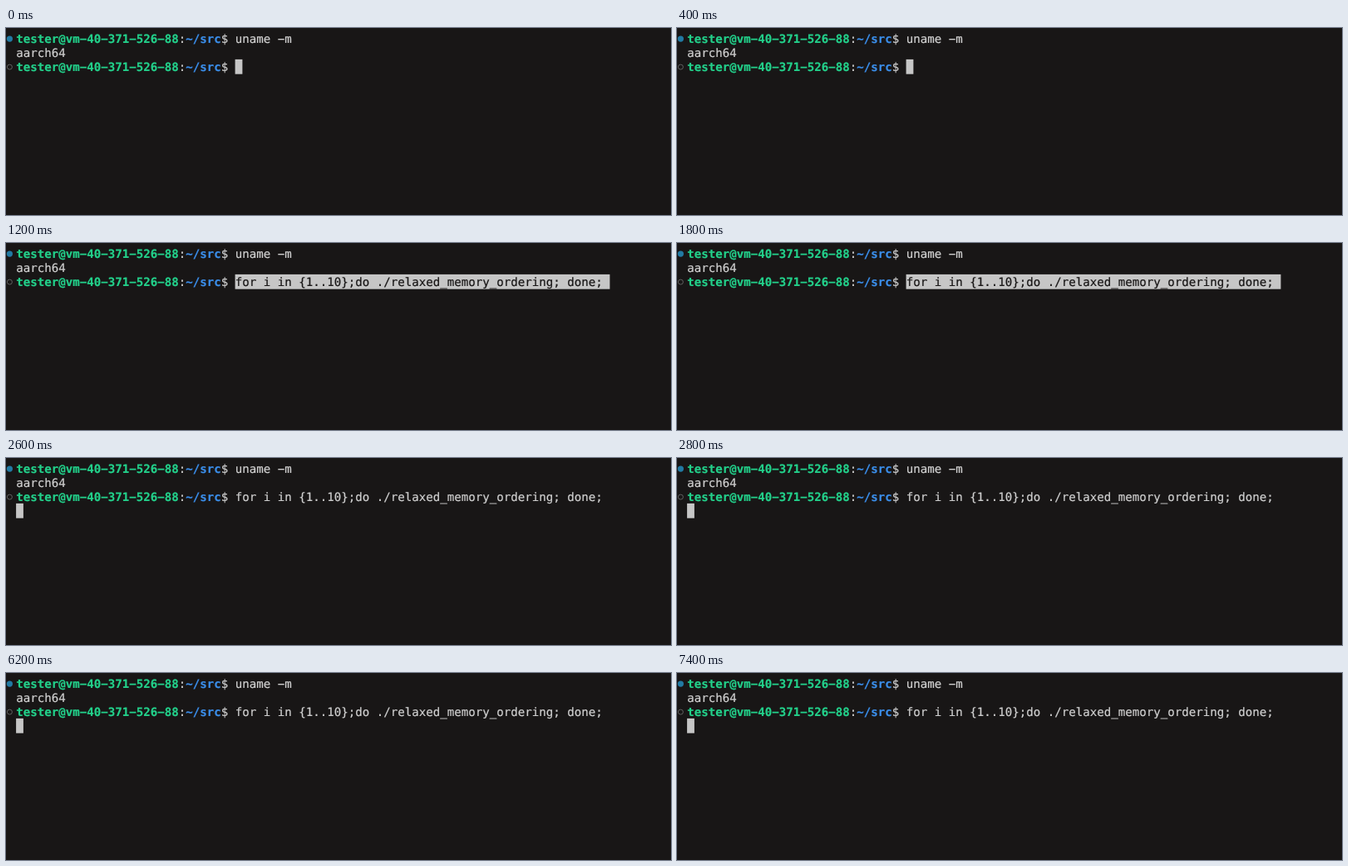
An HTML page with a canvas that plays this animation: 800 by 226 pixels, repeating every 8 s.

```html
<!DOCTYPE html>
<html lang="en">
<head>
<meta charset="utf-8">
<style>
  html, body { margin: 0; width: 100%; height: 100%; overflow: hidden; background: #181616; }
  canvas { display: block; }
</style>
</head>
<body>
<canvas width="800" height="226"></canvas>
<script>
const ctx = document.querySelector("canvas").getContext("2d");

const LOOP = 8000, PASTE_AT = 1200, RUN_AT = 2600;
const LEFT = 12.3, TOP = 4.5, CELL = 8.5, ROW = 17;
const BACK = "#181616", TEXT = "#d0d0d0", GREEN = "#23d18b", BLUE = "#3b8eea", BLOCK = "#c6c6c6";
const COMMAND = "for i in {1..10};do ./relaxed_memory_ordering; done;";

const columnX = column => LEFT + column * CELL;
const rowY = row => TOP + row * ROW;

// Each character sits in its own terminal cell; returns the next free column.
function write(text, column, row, color = TEXT, weight = "normal") {
  ctx.font = `${weight} 14.12px "DejaVu Sans Mono", monospace`;
  ctx.fillStyle = ctx.strokeStyle = color;
  ctx.lineWidth = 0.2;
  for (const char of text) {
    const glyph = char === "-" ? "\u2212" : char;
    const x = columnX(column++), y = rowY(row) + 13.4;
    ctx.fillText(glyph, x, y);
    ctx.strokeText(glyph, x, y);
  }
  return column;
}

function block(column, row, cells) {
  ctx.fillStyle = BLOCK;
  ctx.fillRect(columnX(column) - 0.2, rowY(row) - 0.6, cells * CELL + 0.3, ROW + 0.8);
}

function prompt(row) {
  let column = write("tester@vm-40-371-526-88", 0, row, GREEN, "bold");
  column = write(":", column, row);
  column = write("~/src", column, row, BLUE, "bold");
  return write("$ ", column, row);
}

function marker(row, done) {
  ctx.beginPath();
  ctx.arc(4.4, rowY(row) + 8.6, done ? 3.6 : 3, 0, 2 * Math.PI);
  ctx.fillStyle = "#227aa3";
  ctx.strokeStyle = "#606060";
  ctx.lineWidth = 1;
  if (done) ctx.fill();
  else ctx.stroke();
}

function draw(time) {
  ctx.fillStyle = BACK;
  ctx.fillRect(0, 0, 800, 226);

  marker(0, true);
  write("uname -m", prompt(0), 0);
  write("aarch64", 0, 1);
  marker(2, false);
  const column = prompt(2);

  if (time < PASTE_AT) {
    block(column, 2, 1);
  } else if (time < RUN_AT) {
    block(column, 2, COMMAND.length + 1);
    write(COMMAND, column, 2, BACK);
  } else {
    write(COMMAND, column, 2);
    block(0, 3, 1);
  }
}

function tick() {
  draw(performance.now() % LOOP);
  requestAnimationFrame(tick);
}

ctx.textRendering = "geometricPrecision";
tick();
</script>
</body>
</html>
```
